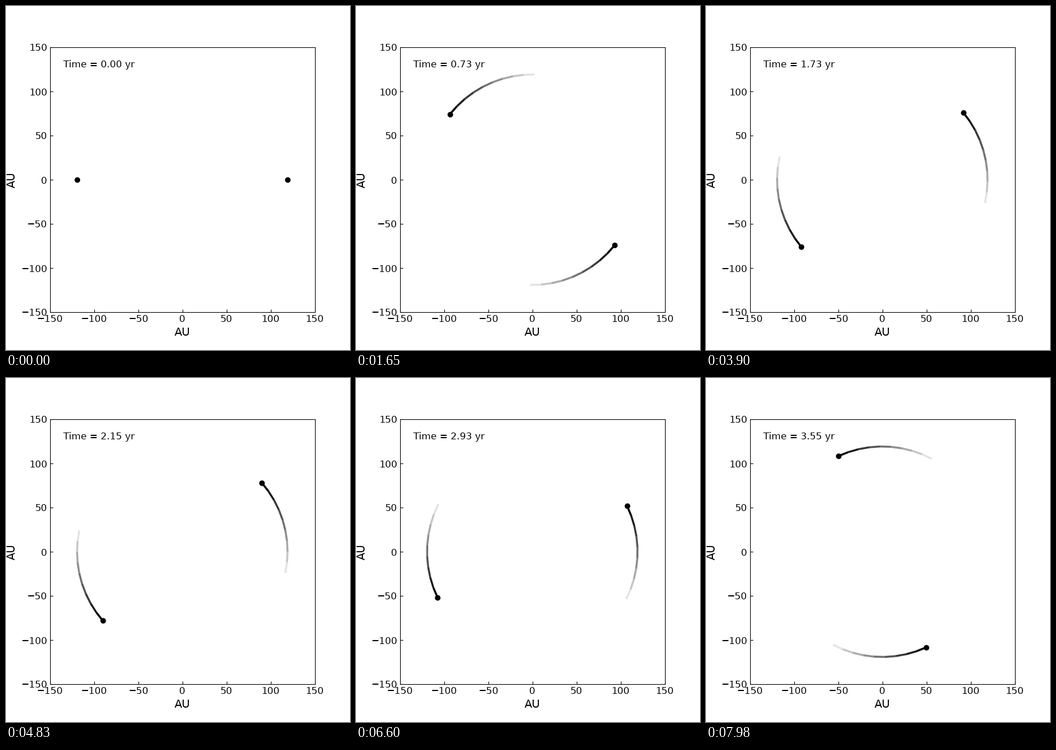
Animation, 600 px wide and 600 px high, one loop 8000 ms. Source, as a matplotlib script:

```python
import numpy as np
import matplotlib.pyplot as plt
from matplotlib.animation import FuncAnimation
from matplotlib.collections import LineCollection

RADIUS = 119.2                # AU
STEP_ANGLE = np.radians(5.8446)
STEPS_PER_YEAR = 75
STEP_MS = 30
TICK_MS = 20
LOOP_MS = 8000
TRAIL = 9                     # segments behind each body

plt.rcParams["font.family"] = "DejaVu Sans"
plt.rcParams["text.hinting"] = "native"

fig, ax = plt.subplots(figsize=(6, 6), dpi=100)
ax.set_aspect("equal")
ax.set_xlim(-150, 150)
ax.set_ylim(-150, 150)
ax.set_xticks(range(-150, 151, 50))
ax.set_yticks(range(-150, 151, 50))
ax.tick_params(direction="in", labelsize=12)

# Text below the axes and the clock are placed by their baselines.
ax.tick_params(axis="x", pad=12.14)
plt.setp(ax.get_xticklabels(), va="baseline")
ax.set_xlabel("AU", fontsize=14, va="baseline")
ax.xaxis.set_label_coords(0.5, -0.0897)
ax.set_ylabel("AU", fontsize=14)
clock = ax.text(0.05, 0.924, "", transform=ax.transAxes, fontsize=12,
                va="baseline")

bodies, = ax.plot([], [], "o", color="black", markersize=6, zorder=3)
trails = LineCollection([], linewidths=2.5, capstyle="butt", zorder=2)
ax.add_collection(trails, autolim=False)


def orbit(step):
    """Position of the first body; the second one is its mirror image."""
    angle = STEP_ANGLE * np.asarray(step)
    return RADIUS * np.stack([np.cos(angle), np.sin(angle)], axis=-1)


def update(i):
    step = (i * TICK_MS + TICK_MS // 2) // STEP_MS
    path = orbit(np.arange(max(0, step - TRAIL), step + 1))
    segments = np.stack([path[:-1], path[1:]], axis=1)
    count = len(segments)

    alphas = np.arange(TRAIL - count + 1, TRAIL + 1) / TRAIL
    colors = [(0, 0, 0, a) for a in alphas] * 2
    trails.set_segments(list(segments) + list(-segments))
    trails.set_color(colors)

    x, y = path[-1]
    bodies.set_data([x, -x], [y, -y])
    clock.set_text(f"Time = {step / STEPS_PER_YEAR:.2f} yr")
    return trails, bodies, clock


anim = FuncAnimation(fig, update, frames=LOOP_MS // TICK_MS, interval=TICK_MS,
                     repeat=True, repeat_delay=0, blit=False)
plt.show()
```
